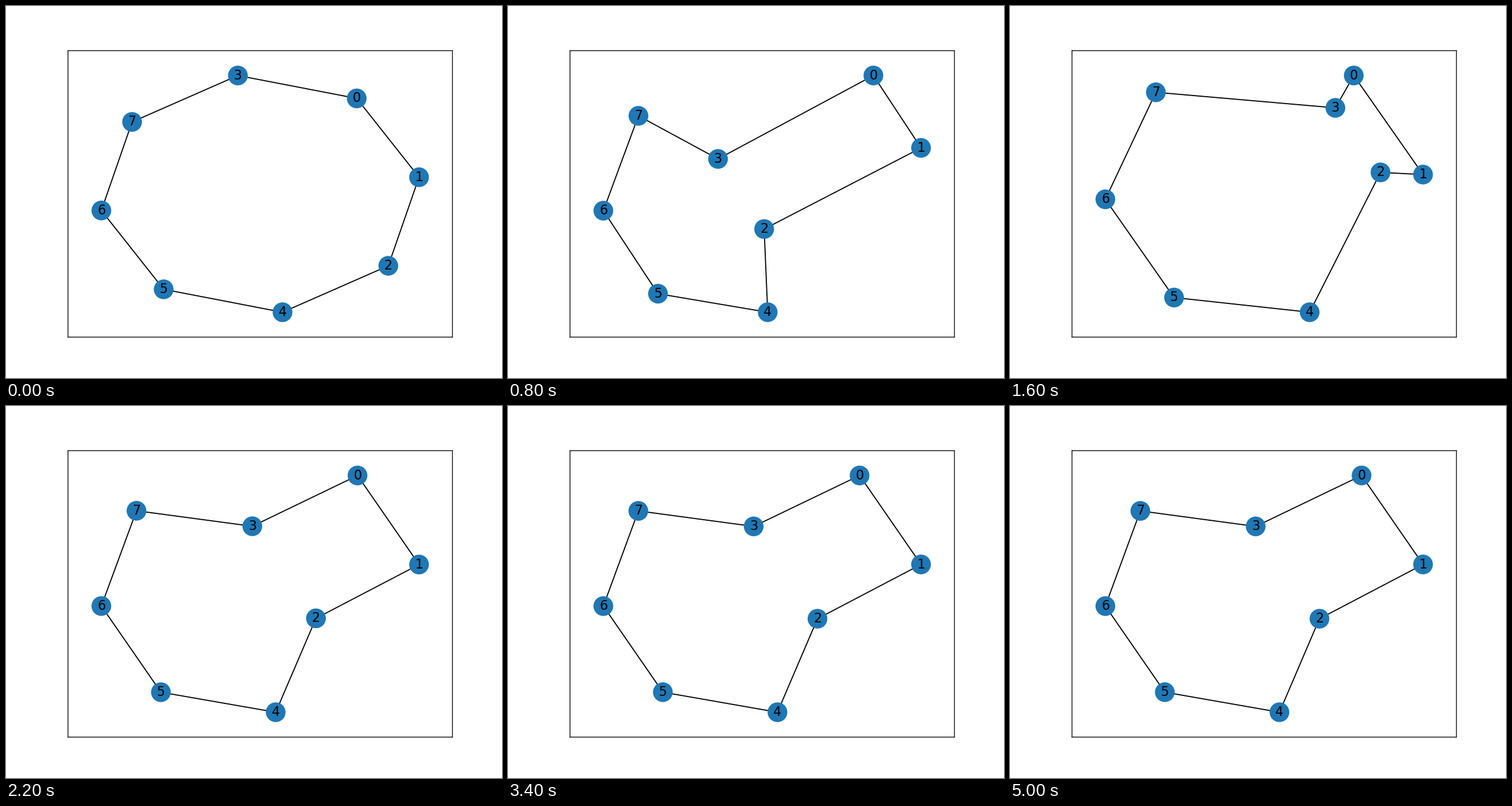
Recreate the animation shown at these times as a matplotlib script. Size 864 by 648 pixels, loop 6.2 s.

```python
import numpy as np
import matplotlib.pyplot as plt
from matplotlib.animation import FuncAnimation
from matplotlib.patches import Circle

W, H, DPI = 864, 648, 135
STEP_MS, FRAMES, LAST = 200, 31, 24
PT = DPI / 72
RADIUS = (np.sqrt(300) + 1) / 2 * PT
TURN = np.exp(1j * np.radians(30.5))
RING = [6, 7, 3, 0, 1, 2, 4, 5]

# The ring is mirrored about a tilted axis: each pair of nodes is one complex
# number, distance along the axis plus half the pair's width times 1j.
OCTAGON = 279.5 * np.exp(1j * np.radians([157.5, 112.5, 67.5, 22.5]))
PULLED = np.array([93.9j, 146.6 + 222.2j, 223.6 + 79.3j, 539.8 + 81.9j])
PUSHED = np.array([118j, 188.3 + 264.2j, 441.7 + 77.5j, 503.3 + 119j])
RELAXED = np.array([102.2j, 151.4 + 239j, 308.6 + 109.6j, 520.6 + 105.6j])
OCTAGON = OCTAGON - OCTAGON[0].real

fig = plt.figure(figsize=(W / DPI, H / DPI), dpi=DPI, facecolor="white")
ax = fig.add_axes([0.125, 0.11, 0.775, 0.77])
X0, X1, Y0, Y1 = 0.125 * W, 0.9 * W, 0.11 * H, 0.88 * H
ax.set(xlim=(X0, X1), ylim=(Y0, Y1), xticks=[], yticks=[])
for spine in ax.spines.values():
    spine.set(snap=False, linewidth=0.72)

# Two 5% margins are stacked around the graph on every side.
MID = np.array([X0 + X1, Y0 + Y1]) / 2
SPAN = np.array([X1 - X0, Y1 - Y0]) / 1.1 ** 2


def swing(a, b, u):
    return a + (b - a) * u * u * (3 - 2 * u)


def half_ring(step):
    if step <= 3:
        return swing(OCTAGON, PULLED, step / 3)
    if step <= 7:
        return swing(PULLED, PUSHED, (step - 3) / 4)
    return RELAXED + (PUSHED - RELAXED) * np.exp(-1.6 * (step - 7))


def layout(step):
    """Node places in ring order, stretched to fill the axes."""
    half = half_ring(step)
    z = np.concatenate([half, half[::-1].conj()]) * TURN
    pos = np.column_stack([z.real, z.imag])
    lo, hi = pos.min(axis=0), pos.max(axis=0)
    return MID + (pos - (lo + hi) / 2) / (hi - lo) * SPAN


loop, = ax.plot([], [], color="black", linewidth=1.0, zorder=1)
nodes = [ax.add_patch(Circle((0, 0), RADIUS, facecolor="#1f77b4",
                             edgecolor="none", zorder=2)) for _ in RING]
labels = [ax.text(0, 0, str(n), size=12, family="DejaVu Sans", color="black",
                  ha="center", va="center", zorder=3) for n in RING]


def draw(i):
    pos = layout(min(max(i - 1, 0), LAST))
    loop.set_data(*np.vstack([pos, pos[:1]]).T)
    for node, label, xy in zip(nodes, labels, pos):
        node.set_center(xy)
        label.set_position(xy)
    return [loop, *nodes, *labels]


anim = FuncAnimation(fig, draw, frames=FRAMES, interval=STEP_MS,
                     repeat=True, repeat_delay=0, blit=False)
plt.show()
```
